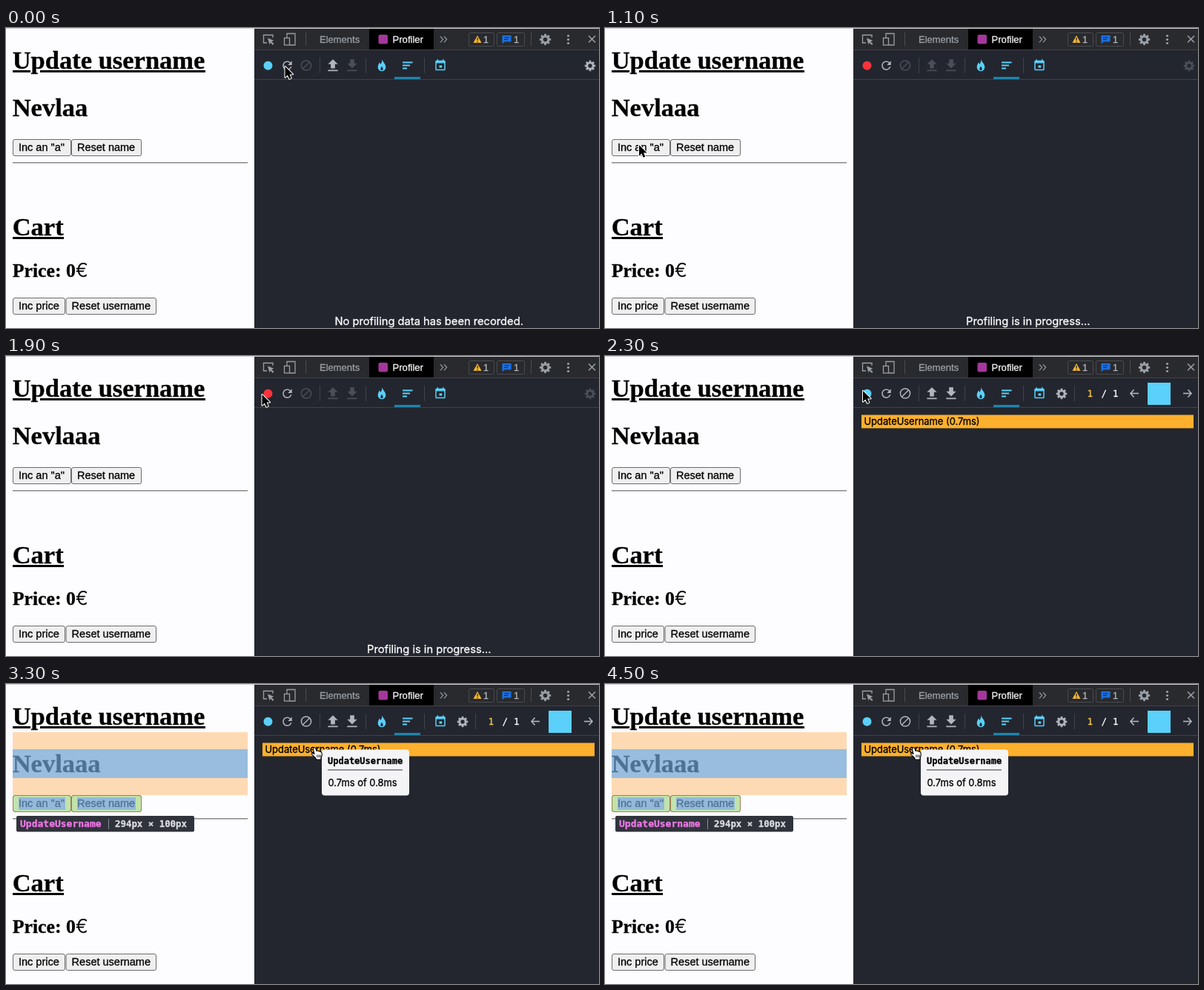
Animation, 800 px wide and 405 px high, one loop 4.6 s. Source, as an HTML page with a canvas:

```html
<!DOCTYPE html>
<html lang="en">
<head>
<meta charset="utf-8">
<title>Profiler demo</title>
<style>
html, body { margin: 0; width: 100%; height: 100%; overflow: hidden; background: #fdfcfe; }
canvas { display: block; width: 800px; height: 405px; }
</style>
</head>
<body>
<canvas id="stage" width="800" height="405"></canvas>
<script>
const g = document.getElementById('stage').getContext('2d');
const LOOP = 4600, STEP = 100;
const START = 400, INC = 1100, STOP = 2300, HOVER = 3000;
const SERIF = '"Liberation Serif", serif';
const SANS = '"Liberation Sans", sans-serif';
const UI = 'Inter, sans-serif';
const MONO = '"DejaVu Sans Mono", monospace';
const CYAN = '#5ad0fa', LIT = '#b2b5bb', DIM = '#4a4e58', RULE = '#3d424b';

// Pointer path: time, x, y
const path = [
  [0, 376.5, 52], [300, 348, 47], [600, 348, 47], [700, 177, 113], [1000, 46, 158],
  [1200, 46, 158], [1400, 202, 113], [1800, 328, 58], [1900, 345.5, 52], [2000, 348, 47],
  [2600, 348, 47], [2800, 406.5, 77], [3000, 412, 85], [LOOP, 412, 85]
];

const icons = {
  reload: 'M17.65 6.35A7.96 7.96 0 0 0 12 4c-4.42 0-7.99 3.58-7.99 8s3.57 8 7.99 8c3.73 0 6.84-2.55 7.73-6h-2.08A5.99 5.99 0 0 1 12 18c-3.31 0-6-2.69-6-6s2.69-6 6-6c1.66 0 3.14.69 4.22 1.78L13 11h7V4z',
  up: 'M5 20h14v-2H5zM5 10h4v6h6v-6h4l-7-7z',
  down: 'M5 20h14v-2H5zM19 9h-4V3H9v6H5l7 7z',
  flame: 'M12.5 .8C13.5 6 19 9 19 15.2A7 7 0 0 1 5 15.2C5 11 7 9 8 6.5C8.8 8 9 9 9.5 10C11.5 8 12.8 4.5 12.5 .8ZM12.3 13.5C10 16 9 17.5 10.5 20.5H13.5C14.8 18 13.5 16 12.3 13.5Z',
  calendar: 'M15 12h-5v4h5zM16 1v2H8V1H6v2H5a2 2 0 0 0-2 2v14a2 2 0 0 0 2 2h14a2 2 0 0 0 2-2V5a2 2 0 0 0-2-2h-1V1zm3 18H5V8h14z'
};
for (const k in icons) icons[k] = new Path2D(icons[k]);
const arrow = new Path2D('M0 0V16L3.7 12.5L6.2 18.2L9 17L6.6 11.5H11.5Z');
const hand = new Path2D('M3 1.2C4 .2 5.4 .8 5.8 2L7 5.4C8 4.6 9.2 5 9.5 5.8C10.6 5.2 11.6 5.7 11.9 6.6C13 6.3 13.8 7 14 8L14.3 11.5L13 14.2V17H6.4L5.6 14.6L1.2 10.6C-.2 9.2 1 7.8 2.4 8.6L4 9.6L2.5 3.4Z');

function rect(x, y, w, h, fill) {
  g.fillStyle = fill;
  g.fillRect(x, y, w, h);
}

function box(x, y, w, h, r, fill, stroke) {
  g.beginPath();
  g.roundRect(x, y, w, h, r);
  if (fill) { g.fillStyle = fill; g.fill(); }
  if (stroke) { g.strokeStyle = stroke; g.lineWidth = 1; g.stroke(); }
}

// A hairline stroke gives the slightly heavy smoothing of the desktop
function text(s, x, y, size, font, fill, weight = '', align = 'left') {
  g.font = `${weight} ${size}px ${font}`;
  g.textAlign = align;
  g.fillStyle = g.strokeStyle = fill;
  g.lineWidth = .3;
  g.lineJoin = 'round';
  g.fillText(s, x, y);
  g.strokeText(s, x, y);
}

function line(color, width, ...pts) {
  g.strokeStyle = color;
  g.lineWidth = width;
  g.lineJoin = 'miter';
  g.beginPath();
  for (let i = 0; i < pts.length; i += 2) g.lineTo(pts[i], pts[i + 1]);
  g.stroke();
}

function disc(x, y, r, fill) {
  g.fillStyle = fill;
  g.beginPath();
  g.arc(x, y, r, 0, 7);
  g.fill();
}

function ring(x, y, r, color, width) {
  g.strokeStyle = color;
  g.lineWidth = width;
  g.beginPath();
  g.arc(x, y, r, 0, 7);
  g.stroke();
}

function icon(name, x, y, scale, fill) {
  g.save();
  g.translate(x, y);
  g.scale(scale, scale);
  g.translate(-12, -12);
  g.fillStyle = fill;
  g.fill(icons[name], 'evenodd');
  g.restore();
}

function gear(x, y, color, r = 7.2) {
  ring(x, y, r * 0.57, color, r * 0.4);
  for (let i = 0; i < 8; i++) {
    const a = i * Math.PI / 4, c = Math.cos(a), s = Math.sin(a);
    line(color, r * 0.38, x + c * r * 0.7, y + s * r * 0.7, x + c * r, y + s * r);
  }
}

function button(label, x, y, w) {
  box(x + .5, y + .5, w - 1, 22, 2.5, '#efeff0', '#6c6c6e');
  text(label, x + 8, y + 16, 14.5, SANS, '#000');
}

function page(t) {
  rect(0, 0, 336, 405, '#fdfcfe');
  text('Update username', 8.7, 55, 34.5, SERIF, '#000', 'bold');
  rect(9, 57, 24, 3, '#000');
  rect(46, 57, 223, 3, '#000');
  text(t < INC ? 'Nevlaa' : 'Nevlaaa', 8.7, 119, 34.5, SERIF, '#000', 'bold');
  button('Inc an "a"', 9, 150, 79);
  button('Reset name', 88, 150, 95);
  rect(9, 181, 317, 1, '#8f8f92');
  rect(9, 182, 317, 1, '#b9b9bc');
  text('Cart', 8.7, 279.5, 34.5, SERIF, '#000', 'bold');
  rect(9, 282, 69, 3, '#000');
  text('Price: 0', 8.7, 336, 25.8, SERIF, '#000', 'bold');
  text('€', 94, 335.5, 25, UI, '#000', '300');
  button('Inc price', 9, 364, 71);
  button('Reset username', 80.6, 364, 122.4);
}

function tabs() {
  rect(335, 0, 465, 30, '#292a2e');
  rect(335, 29, 465, 1, '#3f4145');
  const c = '#9a9fa5';
  // Inspect and device icons
  line(c, 1.3, 352, 20, 347.5, 20, 347.5, 9.5, 360, 9.5, 360, 13);
  g.fillStyle = c;
  g.fill(new Path2D('M353 13.5L361.5 17L358.2 18.2L361.5 21.5L360 23L356.8 19.7L355.5 22.5Z'));
  line(c, 1.3, 379, 13, 379, 7.5, 390, 7.5, 390, 23, 383, 23);
  g.strokeRect(375.5, 13.5, 7, 9.5);
  rect(404, 6, 1, 18, '#494c50');
  text('Elements', 423, 19.5, 13, SANS, c);
  rect(490, 1, 87, 28, '#000');
  box(502.5, 9, 12.5, 12.5, 2, '#a3379b');
  text('Profiler', 521.5, 19.5, 13.1, SANS, '#f4f4f5');
  for (const x of [586, 591]) line(c, 1.2, x, 11.3, x + 3.6, 15.3, x, 19.3);

  box(624.5, 6.5, 34, 18, 2, null, '#4a4c51');
  g.fillStyle = '#f5b62e';
  g.fill(new Path2D('M636 10L641.5 20H630.5Z'));
  rect(635.4, 13, 1.3, 4, '#292a2e');
  rect(635.4, 18, 1.3, 1.3, '#292a2e');
  text('1', 644, 19.5, 12.5, SANS, '#b5b9be');
  box(662.5, 6.5, 37, 18, 2, null, '#4a4c51');
  g.fillStyle = '#1b72e8';
  g.fill(new Path2D('M669.5 10H681.5V18.5H672.5L669.5 21.5Z'));
  rect(672, 12.3, 7, 1.2, '#292a2e');
  rect(672, 15, 5, 1.2, '#292a2e');
  text('1', 685, 19.5, 12.5, SANS, '#b5b9be');
  rect(708, 6, 1, 18, '#494c50');
  gear(727.5, 15.5, c, 7.6);
  for (const y of [10.5, 15.5, 20.5]) disc(758.5, y, 1.6, c);
  line(c, 1.6, 786, 10.5, 795, 19.5);
  line(c, 1.6, 795, 10.5, 786, 19.5);
}

function arrowIcon(x, dir) {
  line(LIT, 1.6, x - 5.5, 50.5, x + 5.5, 50.5);
  line(LIT, 1.6, x + dir, 45.5, x + dir * 5.5, 50.5, x + dir, 55.5);
}

function panel(t) {
  const rec = t >= START && t < STOP, done = t >= STOP;
  rect(335, 30, 465, 375, '#23262f');
  rect(335, 69, 465, 1, RULE);
  tabs();
  rect(0, 0, 800, 1, '#cfced1');
  disc(353.5, 50.7, 6, rec ? '#fa333b' : CYAN);
  icon('reload', 379.5, 50.7, .78, LIT);
  const ban = done ? LIT : DIM;
  ring(405, 50.5, 6.6, ban, 1.5);
  line(ban, 1.5, 400.5, 55, 409.5, 46);
  icon('up', 441, 50.7, .95, rec ? DIM : LIT);
  icon('down', 467, 50.7, .95, done ? LIT : DIM);
  icon('flame', 507, 50.5, .76, CYAN);
  [13.5, 10, 6].forEach((w, i) => rect(535, 45.5 + i * 4, w, 2, CYAN));
  rect(524, 66, 35, 3, '#1787b2');
  icon('calendar', 586, 50.5, .75, CYAN);
  for (const x of [423, 485, 564]) rect(x, 40, 1, 21, RULE);

  if (!done) {
    gear(788, 51, rec ? DIM : LIT);
    const msg = rec ? 'Profiling is in progress...' : 'No profiling data has been recorded.';
    text(msg, 570.7, 400.5, 14.7, UI, '#fff', '', 'center');
    return;
  }
  gear(616, 51, LIT);
  rect(633, 40, 1, 21, RULE);
  text('1', 650.5, 55, 12.5, MONO, '#f6c945');
  text('/', 669.5, 55, 12.5, MONO, '#fff');
  text('1', 685, 55, 12.5, MONO, '#fff');
  arrowIcon(714.5, -1);
  rect(732, 36, 31, 30, CYAN);
  arrowIcon(785.5, 1);
  rect(346, 79.5, 448, 18, '#fdb02d');
  text('UpdateUsername (0.7ms)', 349.5, 93.3, 12.9, UI, '#000');
}

function highlight() {
  const margin = 'rgba(255,155,40,.35)', content = 'rgba(110,163,210,.7)';
  rect(9, 65, 317, 23, margin);
  rect(9, 88, 317, 39, content);
  rect(9, 127, 317, 23, margin);
  for (const [x, w] of [[9, 79], [88, 95]]) {
    box(x + .5, 150.5, w - 1, 22, 3, null, 'rgba(205,150,60,.5)');
    g.fillStyle = 'rgba(90,200,10,.3)';
    g.beginPath();
    g.rect(x + 1, 151, w - 2, 21);
    g.rect(x + 8, 153, w - 16, 17);
    g.fill('evenodd');
    rect(x + 8, 153, w - 16, 17, content);
  }
  box(14, 178, 240, 21.5, 2, '#30333b');
  text('UpdateUsername', 19, 193.3, 13, MONO, '#ee78e6', 'bold');
  rect(138, 182, 1, 14, '#888b91');
  text('294px × 100px', 147, 193.3, 12.4, MONO, '#dcdde0', 'bold');
}

function tooltip() {
  box(426, 88.5, 118, 62, 4, '#f4f4f6');
  text('UpdateUsername', 434, 108, 12, MONO, '#000', 'bold');
  rect(434, 115.5, 101, 1, '#33353a');
  text('0.7ms of 0.8ms', 434.5, 138.3, 12.9, UI, '#000');
}

function pointer(t) {
  const i = path.findIndex(p => p[0] > t);
  const [t0, x0, y0] = path[i - 1], [t1, x1, y1] = path[i];
  const k = (t - t0) / (t1 - t0);
  g.save();
  g.translate(x0 + (x1 - x0) * k, y0 + (y1 - y0) * k);
  g.lineJoin = 'round';
  if (t < HOVER) {
    g.scale(.92, .92);
    g.strokeStyle = '#fff';
    g.lineWidth = 2.2;
    g.stroke(arrow);
    g.fillStyle = '#000';
    g.fill(arrow);
  } else {
    g.fillStyle = '#fff';
    g.fill(hand);
    g.strokeStyle = '#000';
    g.lineWidth = 1.1;
    g.stroke(hand);
    for (const x of [7.8, 10, 12]) line('#000', .9, x, 10.5, x + .1, 14.2);
  }
  g.restore();
}

function frame(now) {
  const t = Math.floor(now % LOOP / STEP) * STEP;
  page(t);
  panel(t);
  if (t >= HOVER) {
    highlight();
    tooltip();
  }
  pointer(t);
}

const begin = performance.now();
function tick() {
  frame(performance.now() - begin);
  requestAnimationFrame(tick);
}
tick();
</script>
</body>
</html>
```
